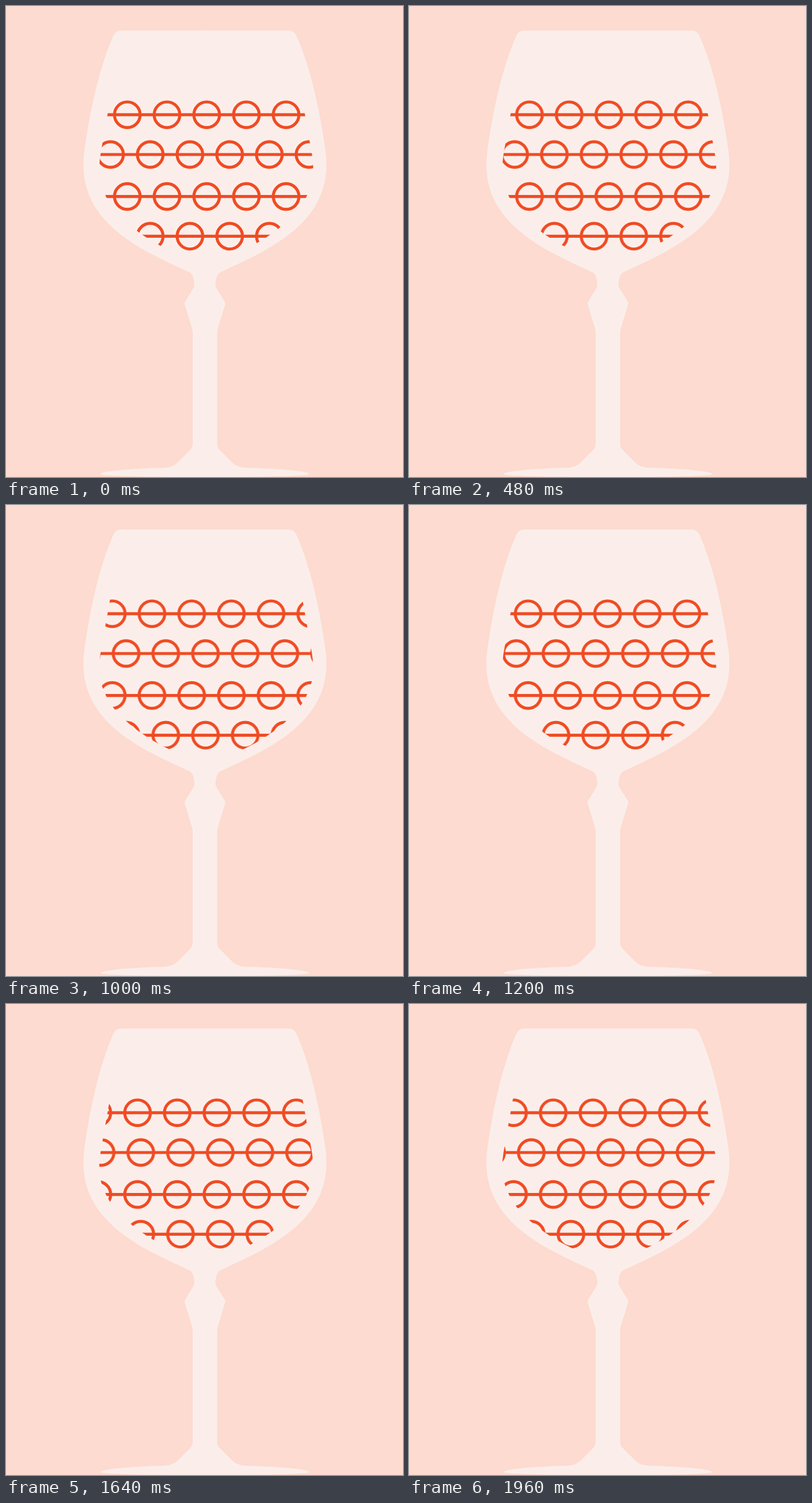
Animation, 687 px wide and 815 px high, one loop 2 s. Source, as an HTML page:

```html
<!DOCTYPE html>
<html lang="en">
<head>
<meta charset="utf-8">
<title>Wine glass</title>
<style>
  html, body { margin: 0; width: 100%; height: 100%; overflow: hidden; background: #fddbd0; }
  svg { display: block; width: 687px; height: 815px; }
  .glass { fill: #fbeeea; }
  .rows { fill: none; stroke: #f04b23; stroke-width: 5.2; }
  .left { animation: left 2s steps(50) infinite; }
  .right { animation: right 2s steps(50) infinite; }
  @keyframes left { to { transform: translateX(-1151.3px); } }
  @keyframes right { to { transform: translateX(1152.9px); } }
</style>
</head>
<body>
<svg viewBox="0 0 687 815">
  <defs>
    <path id="half" d="M346 42.5 H199 Q190 42.5 186 51
      C162 105 145 180 134.8 257 Q134 266 134 275
      C134 380 240 425 318 461 Q325 464.5 326 483 Q326 486 324.5 488
      L310 511.500 Q308.500 514 309.300 516.500
      L322 558 Q323 561 323 565 V758 Q323 764 319 768
      L297 790 Q289 798 275 799 C225 800 164 804.500 164 810
      C164 813.500 260 815 346 815.500 Z"/>
    <path id="bowl" d="M182.400 150 Q172.500 205 163.500 257 Q159 285 163.700 305
      Q174 345 208 374 Q239 402 285 424 L348 452 V150 Z"/>
    <clipPath id="inside">
      <use href="#bowl"/>
      <use href="#bowl" transform="translate(693 0) scale(-1 1)"/>
    </clipPath>
  </defs>
  <g class="glass">
    <use href="#half"/>
    <use href="#half" transform="translate(688.4 0) scale(-1 1)"/>
  </g>
  <g class="rows" clip-path="url(#inside)"></g>
</svg>
<script>
  const PITCH = 68.7, RADIUS = 22.2;
  const rows = document.querySelector('.rows');

  function add(parent, tag, attrs) {
    const el = document.createElementNS('http://www.w3.org/2000/svg', tag);
    for (const name in attrs) el.setAttribute(name, attrs[name]);
    return parent.appendChild(el);
  }

  // Each row is long enough to fill the bowl over its whole travel.
  function addRow(y, dir, x) {
    add(rows, 'path', { d: `M140 ${y}H550` });
    const group = add(rows, 'g', { class: dir < 0 ? 'left' : 'right' });
    for (let k = -4; k <= 21; k++) {
      add(group, 'circle', { cx: x - dir * k * PITCH, cy: y, r: RADIUS });
    }
  }

  addRow(188.2, -1, 347.3);
  addRow(257, 1, 318.3);
  addRow(329.6, -1, 347.3);
  addRow(398.3, 1, 318.3);
</script>
</body>
</html>
```
